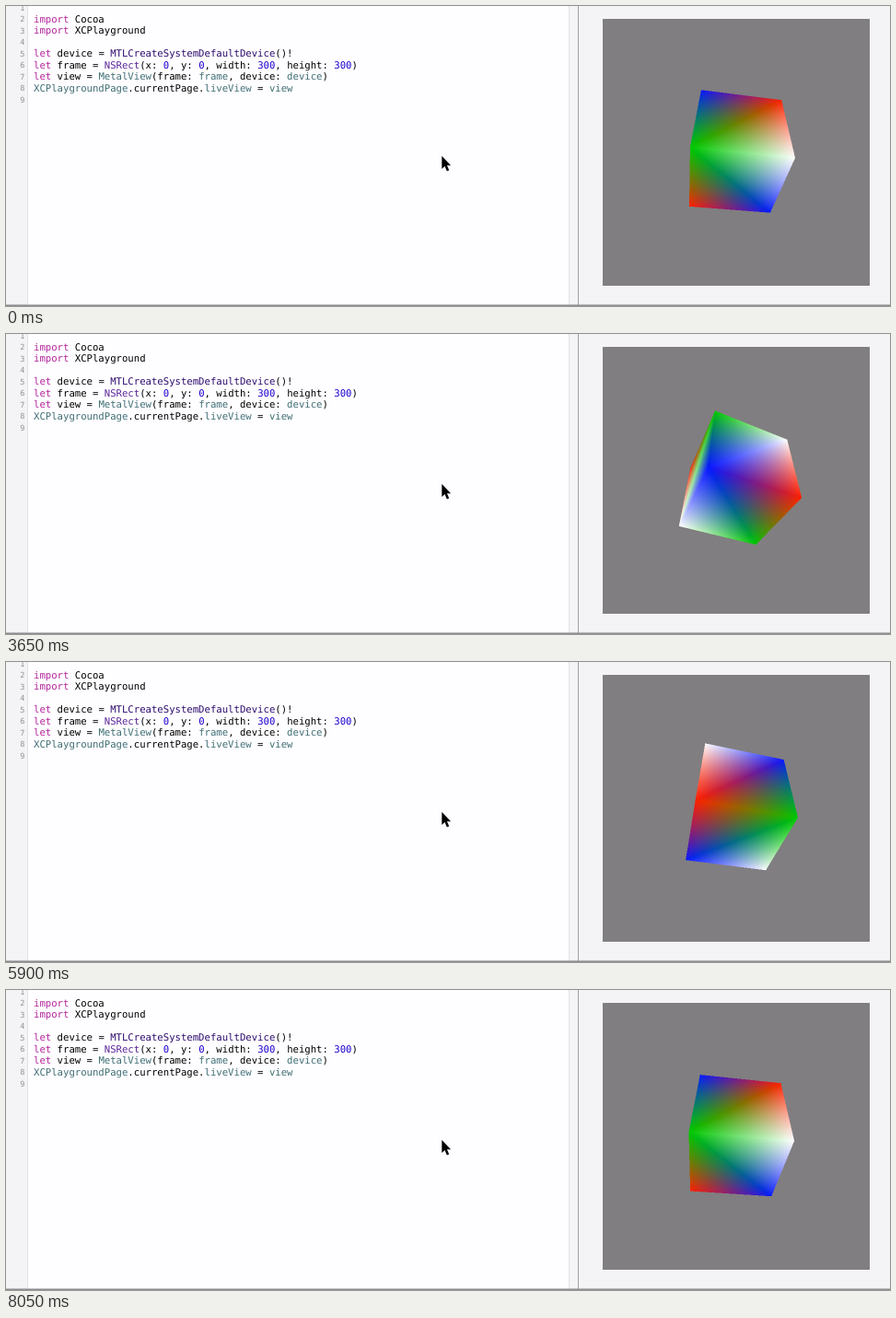
These frames come from a looping animation (960x326 px, 8.1 s). An HTML page with a canvas:

```html
<!DOCTYPE html>
<html lang="en">
<head>
<meta charset="utf-8">
<title>Rotating cube playground</title>
<style>
html, body { margin: 0; width: 960px; height: 326px; overflow: hidden; background: #f4f3f5; }
svg, canvas { position: absolute; display: block; }
svg { left: 0; top: 0; }
canvas { left: 648px; top: 14px; width: 290px; height: 290px; background: #807e80; }
text { font: 10.63px Menlo, "DejaVu Sans Mono", monospace; text-rendering: geometricPrecision; white-space: pre; fill: #000; }
.num { font-size: 8.5px; fill: #929292; text-anchor: end; }
.key { fill: #b4269c; }
.func { fill: #2e0d6e; }
.type { fill: #5c2699; }
.lit { fill: #1c00cf; }
.own { fill: #3f6e74; }
</style>
</head>
<body>
<svg width="960" height="326">
  <path fill="#fefdff" d="M24 0H611V325H24z"/>
  <path fill="#e2e1e3" d="M23 0h1v325h-1zM611 0h1v325h-1z"/>
  <path fill="#a09fa1" d="M621 0h1v325h-1z"/>
  <path fill="#8f8e90" d="M0 324.5H960V326H0z"/>
  <g id="code"></g>
  <path fill="#000" stroke="#fff" stroke-width="1.2" paint-order="stroke" d="M473.3 163v14l3.2-3 2.3 5.4 2.4-1-2.3-5.2h4.2z"/>
</svg>
<canvas id="view" width="580" height="580"></canvas>
<script>
// Source lines; [style|text] marks a coloured run.
const lines = [
  '',
  '[key|import] Cocoa',
  '[key|import] XCPlayground',
  '',
  '[key|let] device = [func|MTLCreateSystemDefaultDevice]()!',
  '[key|let] frame = [type|NSRect](x: [lit|0], y: [lit|0], width: [lit|300], height: [lit|300])',
  '[key|let] view = [own|MetalView](frame: [own|frame], device: [own|device])',
  '[own|XCPlaygroundPage].currentPage.[own|liveView] = [own|view]',
  ''
];
document.getElementById('code').innerHTML = lines.map((line, i) => {
  const y = 5.2 + 12.5 * i;
  const runs = line.replace(/\[(\w+)\|(\w+)\]/g, '<tspan class="$1">$2</tspan>');
  return `<text class="num" x="20.3" y="${y - 0.4}">${i + 1}</text><text x="30" y="${y}">${runs}</text>`;
}).join('');

const SIZE = 580, LOOP = 8100, STEP = 50;
const FOCAL = SIZE / 2 / Math.tan(0.5), TILT = Math.SQRT1_2;
const red = [255, 32, 0], green = [0, 200, 0], blue = [8, 24, 255], white = [255, 255, 255];
const cube = [
  [-1, -1, 1, red], [1, -1, 1, green], [1, 1, 1, blue], [-1, 1, 1, white],
  [-1, -1, -1, blue], [1, -1, -1, white], [1, 1, -1, red], [-1, 1, -1, green]
];
const faces = ['0123', '1562', '3267', '4510', '4037', '7654'];
const ctx = document.getElementById('view').getContext('2d');
const image = ctx.createImageData(SIZE, SIZE);
const pixels = image.data;

// Turn about y, tilt 45 degrees about x, then project from distance 3.
function project([x, y, z, color], angle) {
  const c = Math.cos(angle) / 2, s = Math.sin(angle) / 2;
  const tx = c * x - s * z, tz = s * x + c * z, ty = y / 2;
  const depth = 3 - (tz - ty) * TILT;
  return {
    x: SIZE / 2 + FOCAL * tx / depth,
    y: SIZE / 2 - FOCAL * (ty + tz) * TILT / depth,
    depth, color
  };
}

const edge = (a, b, x, y) => (b.x - a.x) * (y - a.y) - (b.y - a.y) * (x - a.x);

// Perspective-correct colour blend over one front-facing triangle.
function fillTriangle(a, b, c) {
  if (edge(a, b, c.x, c.y) >= 0) return;
  const xs = [a.x, b.x, c.x], ys = [a.y, b.y, c.y];
  const right = Math.max(...xs), bottom = Math.max(...ys);
  for (let py = Math.floor(Math.min(...ys)); py < bottom; py++) {
    for (let px = Math.floor(Math.min(...xs)); px < right; px++) {
      const x = px + 0.5, y = py + 0.5;
      let u = edge(b, c, x, y), v = edge(c, a, x, y), w = edge(a, b, x, y);
      if (u > 0 || v > 0 || w > 0) continue;
      u /= a.depth; v /= b.depth; w /= c.depth;
      const sum = u + v + w, at = 4 * (py * SIZE + px);
      for (let k = 0; k < 3; k++) {
        pixels[at + k] = (u * a.color[k] + v * b.color[k] + w * c.color[k]) / sum;
      }
      pixels[at + 3] = 255;
    }
  }
}

function draw(time) {
  const angle = (81.8 + 0.0449 * time) * Math.PI / 180;
  const points = cube.map(vertex => project(vertex, angle));
  pixels.fill(0);
  for (const face of faces) {
    const [a, b, c, d] = [...face].map(i => points[i]);
    fillTriangle(a, b, c);
    fillTriangle(c, d, a);
  }
  ctx.putImageData(image, 0, 0);
}

const start = performance.now();
let shown = -1;
function tick() {
  const time = Math.floor((performance.now() - start) % LOOP / STEP) * STEP;
  if (time !== shown) draw(shown = time);
  requestAnimationFrame(tick);
}
tick();
</script>
</body>
</html>
```
